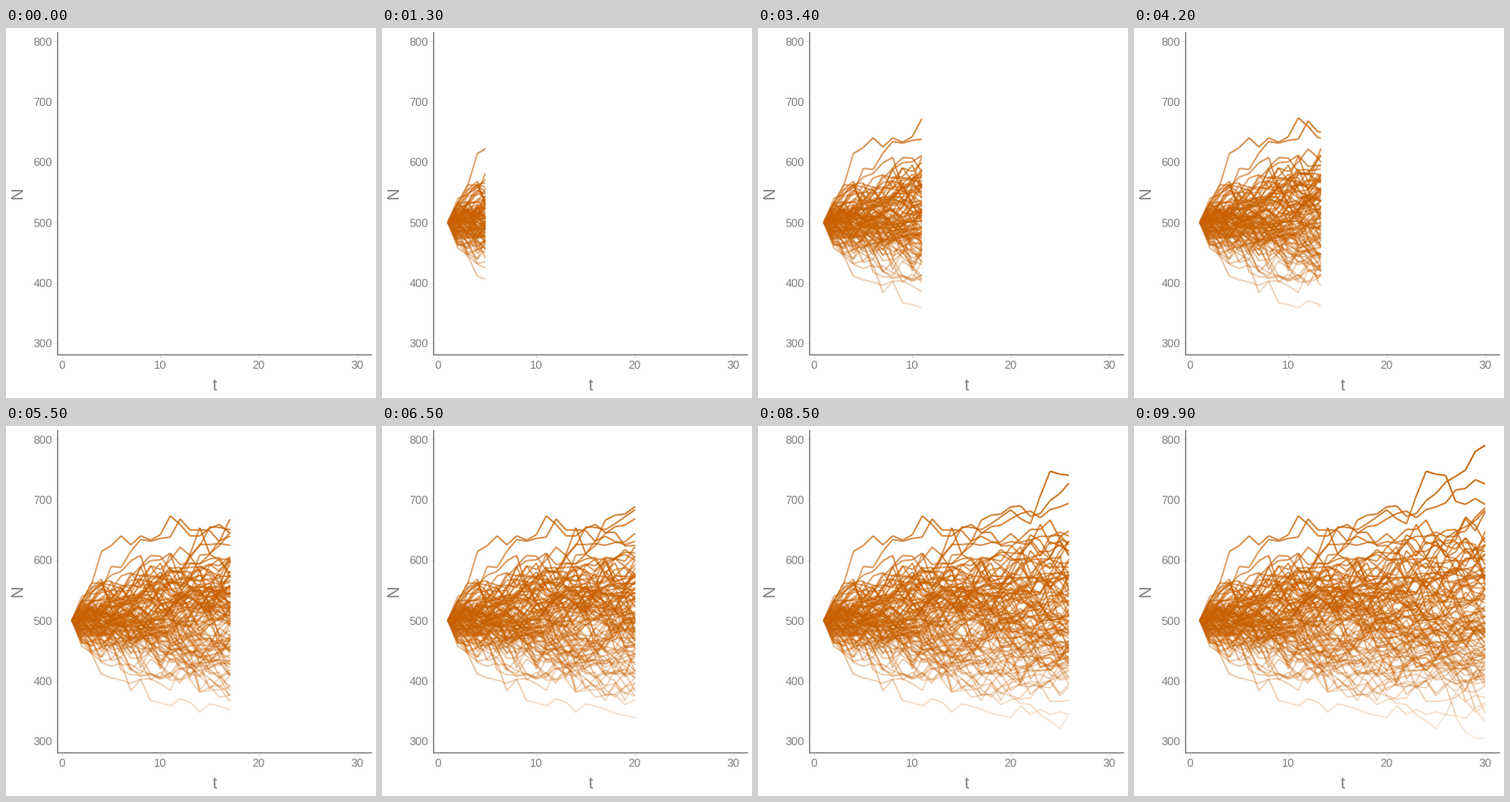
A matplotlib script for the animation above (10000 ms loop, 480 by 480 pixels).

```python
import numpy as np
import matplotlib.pyplot as plt
from matplotlib.animation import FuncAnimation
from matplotlib.collections import LineCollection
from matplotlib.colors import to_rgb

SIZE, DPI = 480, 72          # at 72 dpi one point is one pixel
FRAMES, INTERVAL = 100, 100
T_END, N0 = 30, 500
N_LOW, N_HIGH = 305, 790
WALKS = 100
STEP_SD, PULL = 18, 0.02     # step size, and weak return towards N0
GREY = "#7f7f7f"
ORANGE = "#c86000"

rng = np.random.default_rng(7)
t = np.arange(1, T_END + 1)


def crowd():
    """Random walks that share evenly spread steps and stay in a funnel."""
    shocks = rng.normal(size=WALKS)
    shocks = (shocks - shocks.mean()) / shocks.std()
    n = np.full(WALKS, float(N0))
    path = [n]
    for age in range(1, T_END):
        low, high = N0 - 44 * age ** 0.40, N0 + 48 * age ** 0.42
        sd = STEP_SD * np.sqrt(n / N0)
        n = n + PULL * (N0 - n) + sd * rng.permutation(shocks)
        n = low + abs(n - low)       # bounce off both edges
        n = high - abs(high - n)
        path.append(n)
    return np.array(path).T


def outlier(*keys):
    """Walk through (t, N) key points, wandering more between distant ones."""
    kt, kn = np.transpose([(1, N0), *keys])
    gap = abs(t[:, None] - kt).min(axis=1)
    return np.interp(t, kt, kn) + 7 * np.sqrt(gap) * rng.normal(size=T_END)


outliers = [
    outlier((3, 560), (4, 614), (6, 640), (7, 625), (10, 642), (11, 673),
            (13, 640), (16, 659), (30, 600)),
    outlier((8, 634), (11, 638), (12, 668), (16, 630), (17, 666), (20, 688),
            (23, 677), (26, 729), (28, 749), (30, 790)),
    outlier((20, 683), (22, 660), (24, 747), (26, 740), (27, 697), (30, 692)),
    outlier((20, 668), (25, 688), (27, 716), (29, 733), (30, 726)),
    outlier((10, 364), (13, 365), (14, 348), (16, 358), (19, 343), (30, 372)),
    outlier((22, 361), (25, 321), (26, 345), (29, 305), (30, 305)),
    outlier((4, 411), (7, 396), (30, 440)),
]
walks = rng.permutation(np.vstack([crowd(), outliers]))

# One segment per step; its opacity follows the value it starts from
points = np.stack([np.broadcast_to(t, walks.shape), walks], axis=-1)
segments = np.stack([points[:, :-1], points[:, 1:]], axis=2)
colors = np.empty(segments.shape[:2] + (4,))
colors[..., :3] = to_rgb(ORANGE)
colors[..., 3] = np.clip(
    0.1 + 0.9 * (walks[:, :-1] - N_LOW) / (N_HIGH - N_LOW), 0.1, 1)

plt.rcParams["font.family"] = "Liberation Sans"
plt.rcParams["text.hinting"] = "no_hinting"
fig = plt.figure(figsize=(SIZE / DPI, SIZE / DPI), dpi=DPI, facecolor="white")
ax = fig.add_axes([67 / SIZE, 56 / SIZE, 407 / SIZE, 418 / SIZE])
ax.set_xlim(-0.45, 31.45)
ax.set_ylim(N_LOW - 24.25, N_HIGH + 24.25)
ax.set_xticks(range(0, 31, 10))
ax.set_yticks(range(300, 801, 100))
ax.tick_params(length=4, width=0.8, color="#cccccc", labelcolor=GREY,
               labelsize=14.8)
ax.tick_params(axis="both", pad=3)
for side in ("top", "right"):
    ax.spines[side].set_visible(False)
for side in ("left", "bottom"):
    ax.spines[side].set(color=GREY, linewidth=1.6)

title = dict(size=21.6, color=GREY, ha="center", va="center")
fig.text(270.5 / SIZE, 1 - 464 / SIZE, "t", **title)
fig.text(16 / SIZE, 1 - 214 / SIZE, "N", rotation=90, **title)

lines = LineCollection([], linewidths=2.13, capstyle="butt", zorder=2)
ax.add_collection(lines, autolim=False)


def update(i):
    head = 1 + (T_END - 1) * i / (FRAMES - 1)
    if i == 0:
        lines.set_segments([])
        return [lines]
    k = min(int(head) - 1, T_END - 2)
    part = segments[:, :k + 1].copy()
    a, b = part[:, k, 0], part[:, k, 1]
    part[:, k, 1] = a + (b - a) * (head - t[k])
    lines.set_segments(part.reshape(-1, 2, 2))
    lines.set_color(colors[:, :k + 1].reshape(-1, 4))
    return [lines]


anim = FuncAnimation(fig, update, frames=FRAMES, interval=INTERVAL,
                     repeat=True, repeat_delay=0)
plt.show()
```
